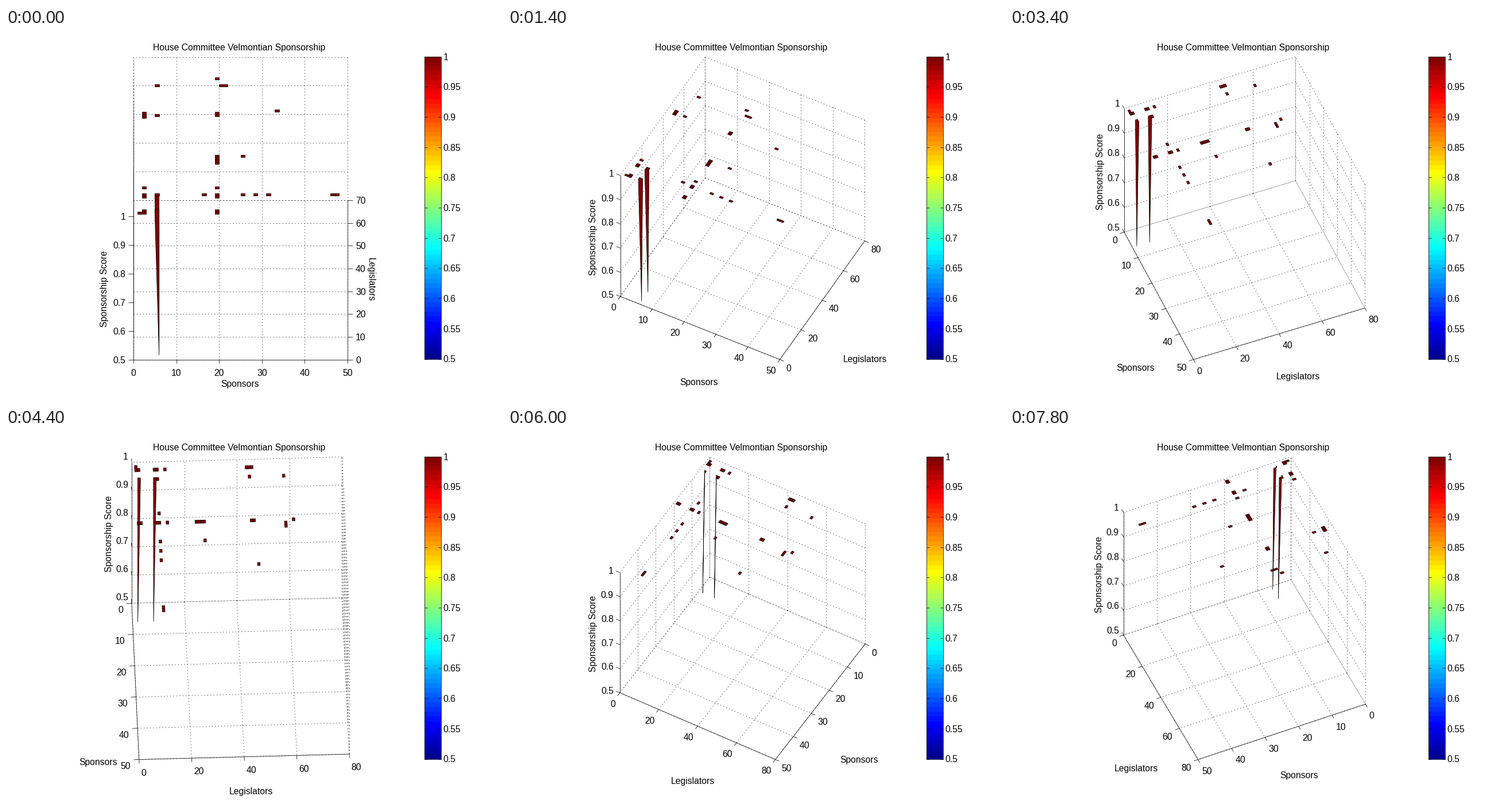
Write a matplotlib script that moves like this. It is 864x648 px and loops after 8 s.

```python
import numpy as np
import matplotlib.pyplot as plt
from matplotlib.animation import FuncAnimation
from matplotlib.collections import LineCollection, PolyCollection
from matplotlib.patches import Rectangle

W, H, DPI = 864, 648, 72
FRAMES, STEP_MS, DEG_PER_FRAME = 40, 200, 4
SIN_E, COS_E = np.sin(np.radians(48)), np.cos(np.radians(48))
CENTER = np.array([408, 313.5])
HEIGHT = 527
X_MAX = 50
TICK = 0.025
THIN = 0.75
DARK_RED = (0.5, 0, 0)

plt.rcParams["font.family"] = "Liberation Sans"
plt.rcParams["font.size"] = 15.75


def quad(x, y, low=1.0):
    return np.array([(x, y, 1), (x + 1, y, low), (x + 1, y + 1, 1), (x, y + 1, 1)])


def make_quads():
    cells = [(x, y) for x in (2, 19) for y in (1, 2, 8, 9, 12, 44, 45)]
    cells += [(x, 9) for x in (5, 16, 25, 28, 31, 46, 47)]
    cells += [(x, 57) for x in (5, 20, 21)]
    cells += [(19, y) for y in range(23, 27)]
    cells += [(1, 1), (2, 43), (5, 44), (19, 60), (25, 26), (33, 46)]
    # two cells have one corner that drops to the floor
    return [quad(x, y) for x, y in cells] + [quad(5, y, 0.5) for y in (2, 8)]


QUADS = make_quads()


# label offsets in pixels, phi being the azimuth within a quarter turn
def left_name_shift(phi):
    return np.array([51 - 0.57 * phi - 0.0042 * phi ** 2, 72 + 0.77 * phi])


def right_name_shift(phi):
    return np.array([66 - 1.05 * phi, 121 - 0.7 * phi])


def tick_shift(phi):
    return np.array([-3.5 - 0.125 * phi, 22.5 - 0.135 * phi])


def z_tick_shift(phi):
    return np.array([-13.5 + 0.085 * phi, -0.13 * phi])


def z_name_shift(phi):
    return np.array([-50.5 + 0.13 * phi, 2])


class View:
    def __init__(self, az):
        a = np.radians(az)
        self.s, self.c = np.sin(a), np.cos(a)
        self.scale = HEIGHT / (COS_E + (abs(self.s) + abs(self.c)) * SIN_E)
        run, rise = self.scale * abs(self.s), self.scale * abs(self.c) * SIN_E
        roomy = az == 0 or min(run, rise) > 150
        self.y_step, self.y_max = (10, 70) if roomy else (20, 80)

    def unit(self, pts):
        size = np.array([X_MAX, self.y_max, 0.5])
        return (np.asarray(pts, float) - [0, 0, 0.5]) / size - 0.5

    def turn(self, vec):
        u, v, w = np.moveaxis(np.asarray(vec, float), -1, 0)
        right = u * self.c + v * self.s
        down = (u * self.s - v * self.c) * SIN_E - w * COS_E
        return self.scale * np.stack([right, down], -1)

    def __call__(self, pts):
        return CENTER + self.turn(self.unit(pts))

    def depth(self, pts):
        u, v, w = self.unit(pts).mean(axis=0)
        return (u * self.s - v * self.c) * COS_E + w * SIN_E


fig = plt.figure(figsize=(W / DPI, H / DPI), dpi=DPI, facecolor="white")
ax = fig.add_axes([0, 0, 1, 1])
ax.set_xlim(-0.5, W - 0.5)
ax.set_ylim(H - 0.5, -0.5)
ax.axis("off")
moving = []


def write(x, y, text, ha="center"):
    return ax.text(x, y + 6, text, ha=ha, va="baseline")


def write_turned(x, y, text, angle):
    return ax.text(x, y, text, ha="center", va="center", rotation=angle)


def lines(segments, **style):
    return ax.add_collection(LineCollection(
        segments, colors="black", linewidths=THIN, **style), autolim=False)


def draw_colorbar():
    left, right, top, bottom = 728, 757, 49, 576
    tall = (bottom - top) / 64
    for i in range(64):
        v = (i + 1) / 64
        rgb = [np.clip(min(4 * v - k, k + 3 - 4 * v), 0, 1) for k in (1.5, 0.5, -0.5)]
        ax.add_patch(Rectangle((left, bottom - (i + 1) * tall), right - left, tall,
                               facecolor=rgb, linewidth=0, antialiased=False))
    ax.add_patch(Rectangle((left, top), right - left, bottom - top, fill=False,
                           edgecolor="black", linewidth=THIN))
    marks = []
    for value in np.linspace(0.5, 1, 11):
        y = bottom - (value - 0.5) * 2 * (bottom - top)
        marks += [[(left, y), (left + 5, y)], [(right - 5, y), (right, y)]]
        write(761, y, f"{value:.2f}".rstrip("0").rstrip("."), "left")
    lines(marks)


def grid(view, xs, ys, zs, back):
    top = view.y_max
    segs = [[(x, 0, 0.5), (x, top, 0.5)] for x in xs]
    segs += [[(0, y, 0.5), (X_MAX, y, 0.5)] for y in ys]
    segs += [[(x, back, 1), (x, back, 0.5)] for x in xs]
    segs += [[(0, y, 0.5), (0, y, 1)] for y in ys]
    segs += [[(X_MAX, back, z), (0, back, z)] for z in zs]
    segs += [[(0, top, z), (0, 0, z)] for z in zs]
    return view(segs)


def draw(frame):
    for artist in moving:
        artist.remove()
    moving.clear()

    az = frame * DEG_PER_FRAME
    phi = az % 90
    view = View(az)
    first = az < 90
    top = view.y_max
    xs = np.arange(0, X_MAX + 1, 10)
    ys = np.arange(0, top + 1, view.y_step)
    zs = np.linspace(0.5, 1, 6)

    near = 0 if first else top
    side = 0 if first else X_MAX
    x_axis = [(x, near, 0.5) for x in xs]
    y_axis = [(X_MAX, y, 0.5) for y in ys]
    z_axis = [(side, 0, z) for z in zs]

    x_out = view.turn((0, -TICK if first else TICK, 0))
    y_out = view.turn((TICK, 0, 0))
    z_out = view.turn((-TICK, 0, 0) if first else (0, -TICK, 0))

    moving.append(lines(grid(view, xs, ys, zs, top - near),
                        linestyles=[(0, (1.8, 5.4))]))
    solid = []
    for axis, out in ((x_axis, x_out), (y_axis, y_out), (z_axis, z_out)):
        pts = view(axis)
        solid.append([pts[0], pts[-1]])
        solid += [[p, p + out] for p in pts]
    moving.append(lines(solid))

    faces = sorted(QUADS, key=view.depth)
    moving.append(ax.add_collection(PolyCollection(
        [view(q) for q in faces], facecolors=[DARK_RED], edgecolors="black",
        linewidths=THIN, zorder=3), autolim=False))

    left_tick = tick_shift(phi)
    right_tick = tick_shift(90 - phi) * [-1, 1]
    left_ha = "right"
    if az == 0:  # seen straight on, labels sit square to their axes
        left_tick, right_tick, left_ha = np.array([0, 23]), np.array([14, 0]), "center"

    x_side = ("Sponsors", x_axis, xs)
    y_side = ("Legislators", y_axis, ys)
    left, right = (x_side, y_side) if first else (y_side, x_side)
    for (name, axis, values), shift, ha, name_shift in (
            (left, left_tick, left_ha, left_name_shift),
            (right, right_tick, "left", right_name_shift)):
        pts = view(axis)
        for p, value in zip(pts, values):
            moving.append(write(*(p + shift), f"{value}", ha))
        if az:
            mid = (pts[0] + pts[-1]) / 2
            moving.append(write(*(mid + name_shift(phi)), name, ha))
    if az == 0:
        moving.append(write(407, 618, "Sponsors"))
        moving.append(write_turned(635, 438, "Legislators", 270))

    pts = view(z_axis)
    for p, value in zip(pts, zs):
        moving.append(write(*(p + z_tick_shift(phi)), f"{value:.1g}", "right"))
    mid = (pts[0] + pts[-1]) / 2 + z_name_shift(phi)
    moving.append(write_turned(*mid, "Sponsorship Score", 90))
    return moving


draw_colorbar()
write(405.5, 32, "House Committee Velmontian Sponsorship")
anim = FuncAnimation(fig, draw, frames=FRAMES, interval=STEP_MS,
                     repeat=True, repeat_delay=0)
plt.show()
```
